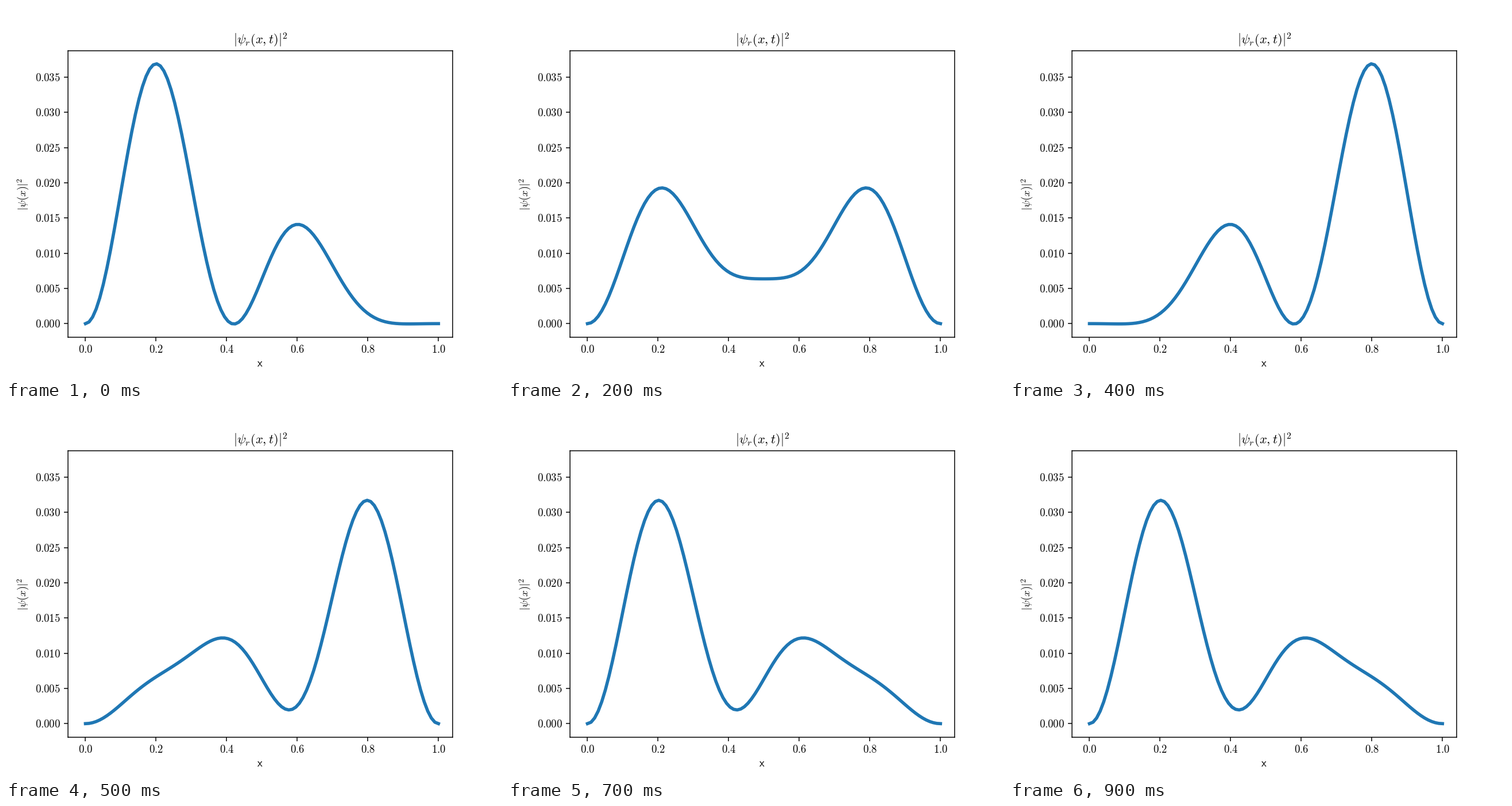
Recreate the animation shown at these times as a matplotlib script. Size 864x648 px, loop 1 s.

```python
import numpy as np
import matplotlib.pyplot as plt
from matplotlib.animation import FuncAnimation

plt.rcParams.update({
    "font.family": "Liberation Serif",
    "mathtext.fontset": "cm",
})

FRAMES = 10
STEPS_PER_PERIOD = 8

x = np.linspace(0, 1, 100)
state2 = np.sin(2 * np.pi * x)
state3 = np.sin(3 * np.pi * x)

# Weights of the two stationary densities and of their interference
steady = 0.01484 * state2**2 + 0.00636 * state3**2
beat = 0.0196 * state2 * state3


def density(step):
    return steady + beat * np.cos(2 * np.pi * step / STEPS_PER_PERIOD)


fig, ax = plt.subplots(figsize=(6.4, 4.8), dpi=135)
fig.subplots_adjust(left=0.125, right=0.9, bottom=0.11, top=0.88)
line, = ax.plot(x, density(0), color="tab:blue", lw=3)

ax.set_xlim(-0.0495, 1.0395)
ax.set_ylim(-0.00191, 0.03877)
ax.set_xticks(np.arange(0, 1.01, 0.2))
ax.set_yticks(np.arange(0, 0.036, 0.005))
ax.xaxis.set_major_formatter(lambda v, pos: f"${v:.1f}$")
ax.yaxis.set_major_formatter(lambda v, pos: f"${v:.3f}$")
ax.set_title(r"$|\psi_r(x,t)|^2$")
ax.set_xlabel(r"$\mathsf{x}$")
ax.set_ylabel(r"$|\psi(x)|^2$")


def update(step):
    line.set_ydata(density(step))
    return line,


anim = FuncAnimation(fig, update, frames=FRAMES, interval=100, repeat=True)
plt.show()
```
